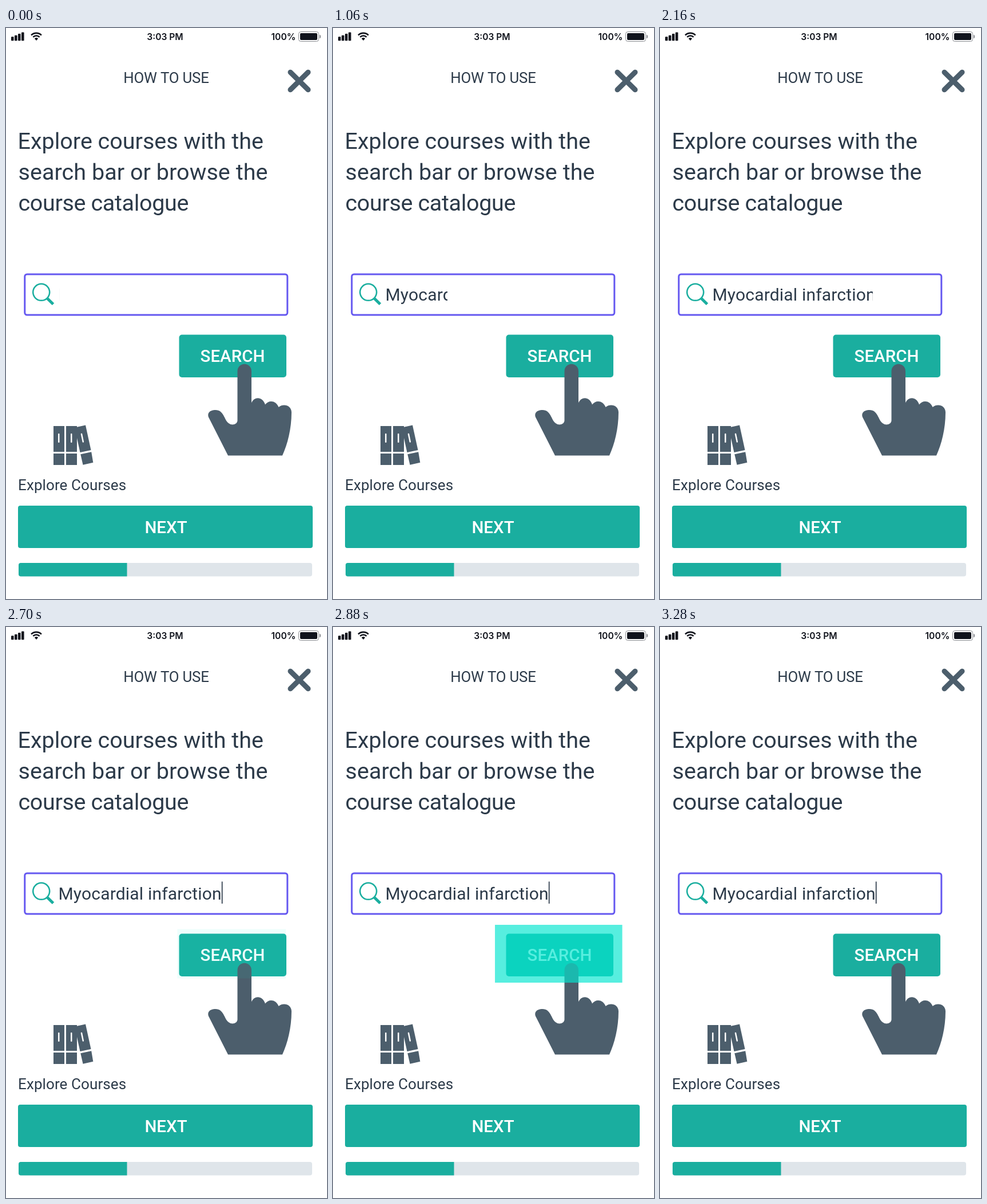
Write an HTML page with a canvas that moves like this. It is 561 by 997 pixels and loops after 5.58 s.

```html
<!DOCTYPE html>
<html lang="en">
<head>
<meta charset="utf-8">
<title>How to use</title>
<style>
html, body { margin: 0; width: 100%; height: 100%; overflow: hidden; background: #fff; }
canvas { display: block; width: 561px; height: 997px; }
</style>
</head>
<body>
<canvas id="stage"></canvas>
<script>
const W = 561, H = 997, LOOP = 5580, STEP = 20;
const TEAL = '#1aae9f', SLATE = '#4c5e6c', INK = '#2c3a49', BLACK = '#10131c';

const canvas = document.getElementById('stage');
const ctx = canvas.getContext('2d');
const dpr = window.devicePixelRatio || 1;
canvas.width = W * dpr;
canvas.height = H * dpr;

// [time, value] keys
const typing = [[180, 94], [740, 145], [1060, 200], [1300, 246], [1680, 316], [1860, 342], [2360, 381]];
const pulse = [[2680, 189], [2880, 222.5], [2940, 227], [3100, 177], [3260, 33], [3280, 0]];

// Smooth curve through the keys, at rest at both ends
function curve(keys, t) {
  const last = keys.length - 1;
  if (t <= keys[0][0]) return keys[0][1];
  if (t >= keys[last][0]) return keys[last][1];
  const slope = i => i === 0 || i === last ? 0
    : (keys[i + 1][1] - keys[i - 1][1]) / (keys[i + 1][0] - keys[i - 1][0]);
  const i = keys.findIndex(k => k[0] > t) - 1;
  const [t0, a] = keys[i], [t1, b] = keys[i + 1];
  const d = t1 - t0, u = (t - t0) / d, v = 1 - u;
  return v * v * (1 + 2 * u) * a + u * u * (3 - 2 * u) * b
    + d * u * v * (v * slope(i) - u * slope(i + 1));
}

function text(str, x, y, size, { weight = 400, color = INK, spacing = 0, align = 'left', family = 'Roboto' } = {}) {
  ctx.font = `${weight} ${size}px ${family}, sans-serif`;
  ctx.letterSpacing = spacing + 'px';
  ctx.textAlign = align;
  ctx.fillStyle = color;
  ctx.fillText(str, x, y);
}

function box(x, y, w, h, r, color) {
  ctx.fillStyle = color;
  ctx.beginPath();
  ctx.roundRect(x, y, w, h, r);
  ctx.fill();
}

function poly(points, color) {
  ctx.fillStyle = color;
  ctx.beginPath();
  points.forEach(p => ctx.lineTo(...p));
  ctx.fill();
}

function line(x1, y1, x2, y2, width, color, cap = 'butt') {
  ctx.strokeStyle = color;
  ctx.lineWidth = width;
  ctx.lineCap = cap;
  ctx.beginPath();
  ctx.moveTo(x1, y1);
  ctx.lineTo(x2, y2);
  ctx.stroke();
}

function statusBar() {
  for (let i = 0; i < 4; i++) {
    const h = 7 + i * 2.6;
    box(9 + i * 6, 22.3 - h, 4.6, h, 1, BLACK);
  }
  const cx = 53, cy = 21.5, a0 = -Math.PI * 0.75, a1 = -Math.PI * 0.25;
  ctx.strokeStyle = BLACK;
  ctx.lineWidth = 2.6;
  ctx.lineCap = 'butt';
  for (const r of [12.6, 8]) {
    ctx.beginPath();
    ctx.arc(cx, cy, r, a0, a1);
    ctx.stroke();
  }
  ctx.fillStyle = BLACK;
  ctx.beginPath();
  ctx.moveTo(cx, cy + 0.5);
  ctx.arc(cx, cy, 4.4, a0, a1);
  ctx.fill();

  const style = { weight: 600, color: BLACK, family: 'Inter' };
  text('3:03 PM', 278, 21, 15.6, { ...style, align: 'center' });
  text('100%', 463.5, 21, 15.6, style);

  ctx.strokeStyle = '#8a8c91';
  ctx.lineWidth = 1;
  ctx.beginPath();
  ctx.roundRect(511.5, 6.5, 35, 17, 4);
  ctx.stroke();
  box(514, 9, 30, 12, 2, BLACK);
  box(548, 12, 2, 6, [0, 2, 2, 0], '#8a8c91');
}

function heading() {
  text('HOW TO USE', 280, 95.5, 25.8, { align: 'center', spacing: -0.2 });
  line(497, 77.2, 528, 107.8, 9, SLATE, 'round');
  line(528, 77.2, 497, 107.8, 9, SLATE, 'round');
  text('Explore courses with the', 20.5, 211, 39.5);
  text('search bar or browse the', 21.5, 265, 39.5, { spacing: 0.05 });
  text('course catalogue', 21.5, 319, 39.5, { spacing: -0.35 });
}

function searchField(t) {
  ctx.strokeStyle = '#6558f0';
  ctx.lineWidth = 3;
  ctx.beginPath();
  ctx.roundRect(32.8, 430, 459, 71, 4);
  ctx.stroke();

  ctx.strokeStyle = TEAL;
  ctx.lineWidth = 2.6;
  ctx.beginPath();
  ctx.arc(61.7, 461.3, 14.5, 0, Math.PI * 2);
  ctx.stroke();
  line(71.5, 471.5, 82.5, 482.3, 5, TEAL);

  ctx.save();
  ctx.beginPath();
  ctx.rect(90, 440, curve(typing, t) - 90, 50);
  ctx.clip();
  text('Myocardial infarction', 91.5, 476, 30, { spacing: 0.18 });
  line(377.7, 444.5, 377.7, 483, 1.7, INK);
  ctx.restore();
}

function books() {
  for (const x of [83, 105]) {
    box(x, 695, 19, 45, 0, SLATE);
    box(x, 743, 19, 20, 0, SLATE);
    box(x + 8, 708, 2.5, 16, 1, '#fff');
  }
  poly([[124, 696.8], [139, 693.4], [148.5, 737], [129.5, 741], [124, 716]], SLATE);
  poly([[130.3, 744.3], [149.2, 740.2], [152.3, 758.8], [134.5, 762.8]], SLATE);
  line(132, 709, 134.8, 722.5, 2.5, '#fff', 'round');
  text('Explore Courses', 21, 807, 26, { spacing: 0.1 });
}

const hand = new Path2D(`M404.5 599 A12.25 12.25 0 0 1 429 599 V654.5
  C434 643 448 643 453 657.5 C459 649 472 650 476.5 662
  C485 655 499 659 499 671 C499 700 492 727 483 746.5 H388
  L355 681.5 C350 672 357 667 366 667 C381 667 381 684 389 690
  C395 695 404.5 692 404.5 685 Z`);

function searchButton(t) {
  const label = { weight: 500, color: '#fff', align: 'center' };
  box(302.5, 535.5, 187.5, 74.5, 5, TEAL);
  text('SEARCH', 396, 583, 29.5, label);
  ctx.fillStyle = SLATE;
  ctx.fill(hand);

  const alpha = 1 - Math.abs(t - 2980) / 300;
  if (alpha > 0.001) {
    const w = curve(pulse, t), h = w * 0.454;
    ctx.globalAlpha = alpha;
    ctx.fillStyle = '#03e6cf';
    ctx.fillRect(394.3 - w / 2, 570.5 - h / 2, w, h);
    ctx.globalAlpha = 1;
  }
}

function footer() {
  box(21, 834, 515, 74, 4, TEAL);
  text('NEXT', 279.5, 881.5, 29.5, { weight: 500, color: '#fff', align: 'center' });
  box(22, 934, 513, 23.5, 4, '#dfe5ea');
  box(22, 934, 189.5, 23.5, [4, 0, 0, 4], TEAL);
}

function draw(t) {
  ctx.setTransform(dpr, 0, 0, dpr, 0, 0);
  ctx.fillStyle = '#fff';
  ctx.fillRect(0, 0, W, H);
  statusBar();
  heading();
  searchField(t);
  books();
  searchButton(t);
  footer();
}

const start = performance.now();
function tick() {
  const t = (performance.now() - start) % LOOP;
  draw(Math.floor(t / STEP) * STEP);
  requestAnimationFrame(tick);
}
tick();
</script>
</body>
</html>
```
